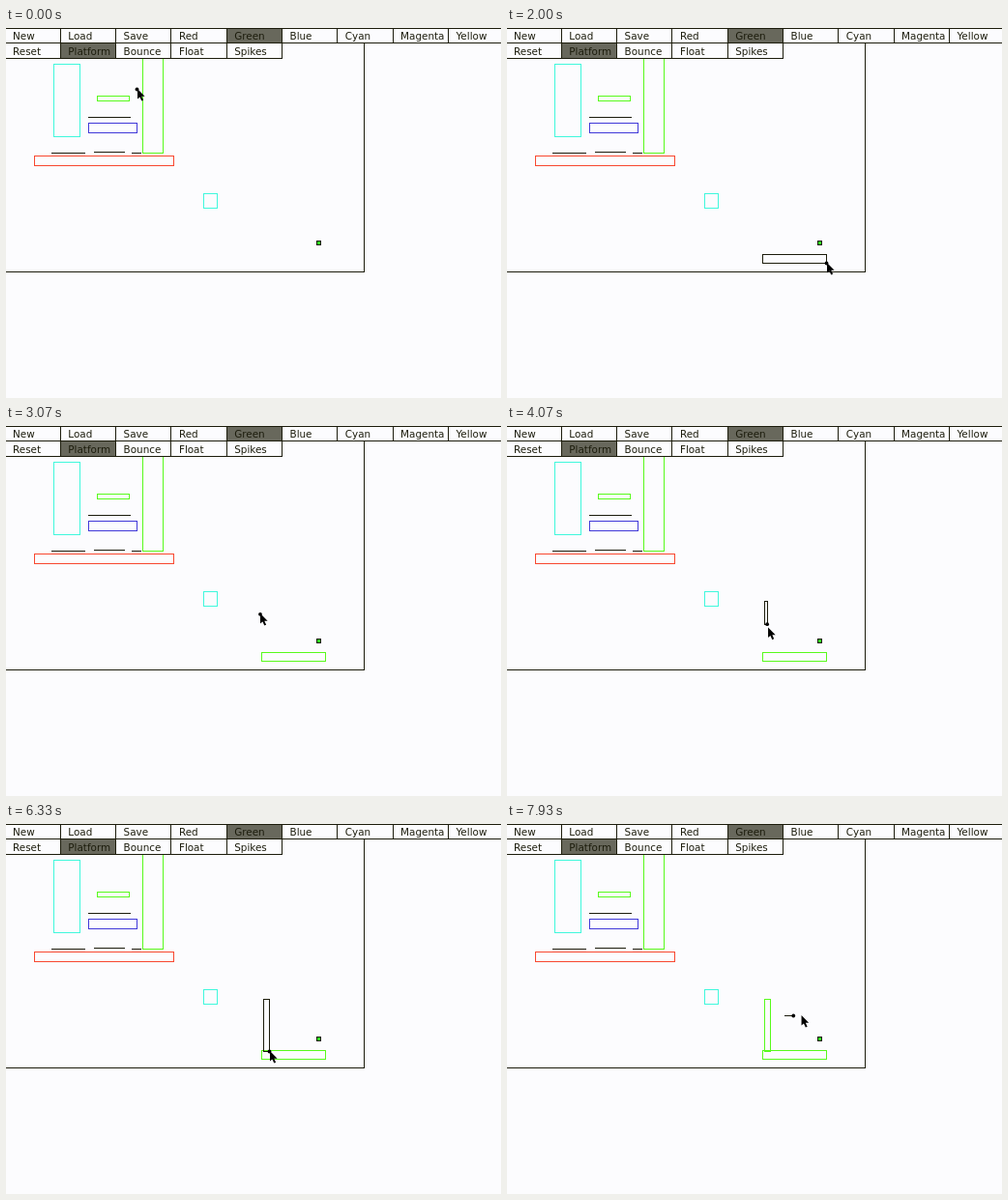
Recreate the animation shown at these times as an HTML page with a canvas. Size 512x383 px, loop 8 s.

```html
<!DOCTYPE html>
<html lang="en">
<head>
<meta charset="utf-8">
<title>Level editor</title>
<style>
html, body { margin: 0; width: 100%; height: 100%; overflow: hidden; background: #fcfcfe; }
canvas { display: block; }
</style>
</head>
<body>
<canvas id="stage" width="512" height="383"></canvas>
<script>
const ctx = document.getElementById('stage').getContext('2d');
const LOOP = 8000, STEPS = 120, STEP = LOOP / STEPS;
const PAPER = '#fcfcfe', INK = '#1c1c0c', GREEN = '#58fa1c', CYAN = '#40f8dc';
const BLUE = '#4038d8', RED = '#f84830', PRESSED = '#68685c';
const CELL = 57.3, ROW = 16;

const menu = [
  ['New', 'Load', 'Save', 'Red', 'Green', 'Blue', 'Cyan', 'Magenta', 'Yellow'],
  ['Reset', 'Platform', 'Bounce', 'Float', 'Spikes']
];
const selected = ['Green', 'Platform'];

// Stops of the pointer; it eases out into each one and rests until the next departure
const stops = [
  { leave: 0, x: 135, y: 63 },
  { arrive: 14, x: 264, y: 234 },
  { arrive: 18, x: 295, y: 234 },
  { arrive: 27, leave: 34, x: 330, y: 243 },
  { arrive: 46, x: 262, y: 194 },
  { arrive: 50, leave: 55, x: 266, y: 181 },
  { arrive: 75, leave: 106, x: 272, y: 235 },
  { arrive: 117, x: 287, y: 198 },
  { arrive: 127, x: 333, y: 198 }
];

// Steps at which the button goes down and up
const drags = [{ down: 14, up: 34 }, { down: 55, up: 105 }, { down: 117, up: 127 }];

const easeOut = u => 1 - (1 - u) ** 2;

function pointer(step) {
  if (step <= 0) return stops[0];
  const i = stops.findIndex(s => s.arrive >= step);
  const a = stops[i - 1], b = stops[i];
  const start = a.leave ?? a.arrive;
  const u = easeOut(Math.max(0, step - start) / (b.arrive - start));
  return { x: a.x + (b.x - a.x) * u, y: a.y + (b.y - a.y) * u };
}

function fill(color, x, y, w, h) {
  ctx.fillStyle = color;
  ctx.fillRect(x, y, w, h);
}

function box(color, x, y, w, h) {
  if (!w || !h) return fill(color, x, y, w + 1, h + 1);
  ctx.strokeStyle = color;
  ctx.strokeRect(x + 0.5, y + 0.5, w, h);
}

function drawLevel() {
  box(INK, -1, -1, 371, 253);
  box(CYAN, 49, 37, 27, 75);
  box(GREEN, 141, 20, 21, 109);
  box(GREEN, 94, 70, 33, 5);
  box(INK, 85, 92, 43, 0);
  box(BLUE, 85, 98, 50, 10);
  box(INK, 47, 129, 34, 0);
  box(INK, 91, 128, 31, 0);
  box(INK, 130, 129, 9, 0);
  box(RED, 29, 132, 144, 10);
  box(CYAN, 204, 171, 14, 15);
  fill('#30d820', 321, 220, 5, 5);
  box(INK, 321, 220, 4, 4);
}

function drawMenu() {
  ctx.font = '10.4px "DejaVu Sans", sans-serif';
  const edge = i => Math.floor(i * CELL - 0.9);
  menu.forEach((labels, row) => {
    const top = row * ROW;
    labels.forEach((label, i) => {
      const x = edge(i), w = edge(i + 1) - x;
      fill(selected.includes(label) ? PRESSED : PAPER, x, top, w, ROW);
      box(INK, x, top - 1, w, ROW);
      ctx.fillStyle = INK;
      ctx.fillText(label, i * CELL + 7, top + 12);
    });
  });
  fill(INK, 0, 0, 512, 1);
}

function drawDrags(step) {
  for (const { down, up } of drags) {
    if (step <= down) continue;
    const a = pointer(down), b = pointer(Math.min(step - 1, up));
    box(step > up ? GREEN : INK, a.x, a.y, Math.round(b.x - a.x), Math.round(b.y - a.y));
  }
}

function drawPointer(step) {
  const tip = pointer(step), dot = pointer(step - 1);
  ctx.fillStyle = '#000';
  ctx.beginPath();
  ctx.arc(dot.x + 0.5, dot.y + 0.5, 1.9, 0, Math.PI * 2);
  ctx.fill();
  ctx.save();
  ctx.translate(tip.x + 1, tip.y);
  ctx.fill(new Path2D('M0 0V10.5L2.4 8.4L4.3 12.6L6.1 11.8L4.3 7.7H7.6Z'));
  ctx.restore();
}

function frame(now) {
  const step = Math.min(STEPS - 1, Math.floor((now % LOOP + 4) / STEP));
  fill(PAPER, 0, 0, 512, 383);
  drawLevel();
  drawDrags(step);
  drawMenu();
  drawPointer(step);
  requestAnimationFrame(frame);
}
requestAnimationFrame(frame);
</script>
</body>
</html>
```
